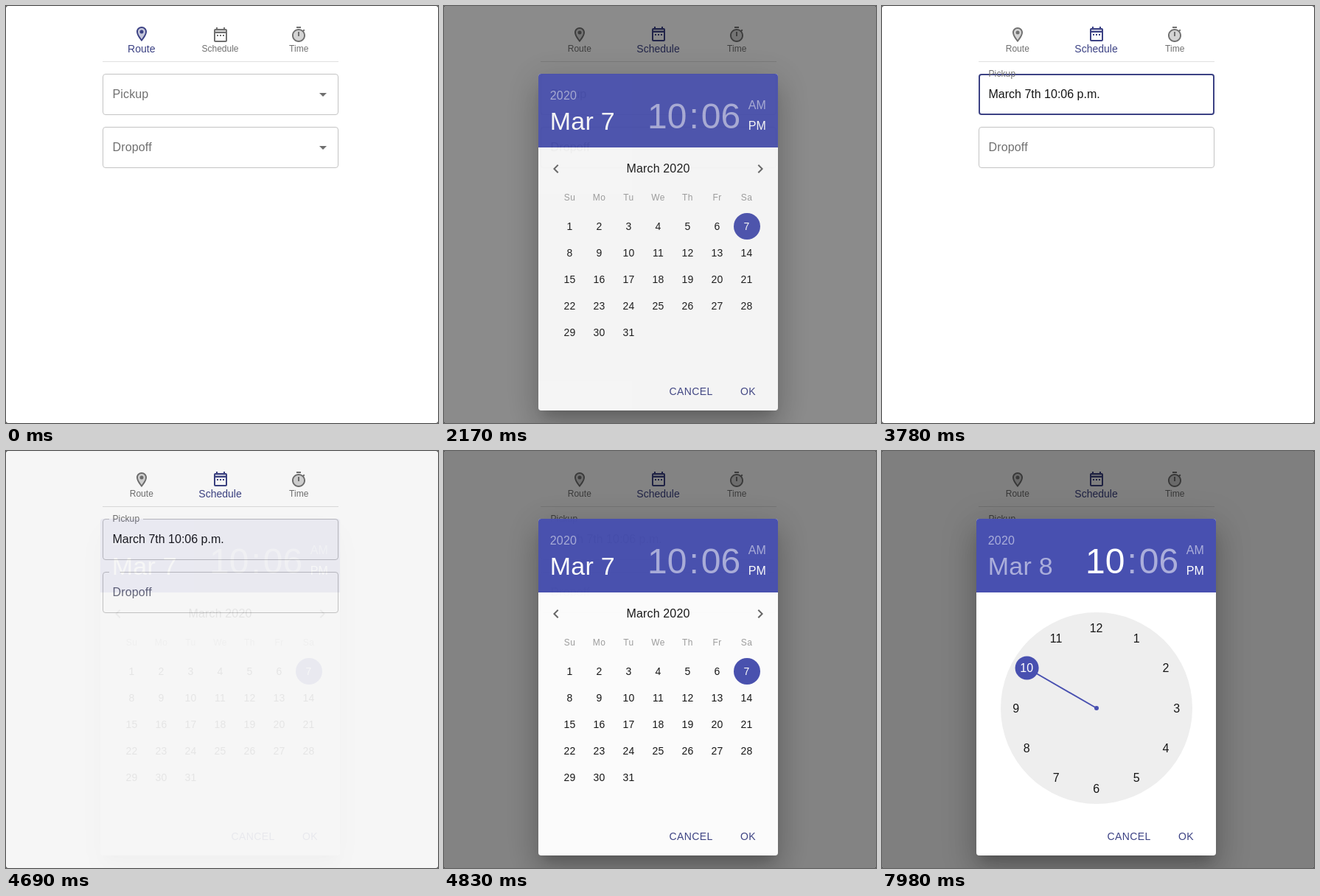
Recreate the animation shown at these times as an HTML page. Size 586 by 566 pixels, loop 8000 ms.

```html
<!DOCTYPE html>
<html lang="en">
<head>
<meta charset="utf-8">
<title>Booking form</title>
<style>
html, body { margin: 0; width: 100%; height: 100%; overflow: hidden; background: #444; }
svg { display: block; width: 586px; height: 566px; background: #fff; border-radius: 3px; }
text { font-family: "Liberation Sans", Arial, sans-serif; white-space: pre; }
#paper { filter: drop-shadow(0 0 0 transparent); }
.shadow { position: absolute; left: 128px; top: 92px; width: 325px; height: 457px; border-radius: 4px;
  box-shadow: 0 11px 15px -7px rgba(0,0,0,.2), 0 24px 38px 3px rgba(0,0,0,.14), 0 9px 46px 8px rgba(0,0,0,.12); }
</style>
</head>
<body>
<svg id="stage" viewBox="0 0 586 566">
  <defs>
    <clipPath id="tabClip"><rect x="237" y="19" width="107" height="56"/></clipPath>
    <clipPath id="okClip"><rect x="381" y="505" width="64" height="36" rx="4"/></clipPath>
    <clipPath id="paperClip"><rect x="128" y="92" width="325" height="457" rx="4"/></clipPath>
  </defs>
  <g id="page"></g>
  <rect id="backdrop" width="586" height="566"/>
  <g id="dialog"></g>
</svg>
<script>
const NS = 'http://www.w3.org/2000/svg';
const $ = id => document.getElementById(id);
const GREY = [112, 112, 112], INDIGO = [60, 66, 132], PRIMARY = '#4850b0', INK = '#161616';

function add(parent, tag, attrs = {}, text) {
  const el = document.createElementNS(NS, tag);
  set(el, attrs);
  if (text !== undefined) el.textContent = text;
  parent.appendChild(el);
  return el;
}
function set(el, attrs) {
  for (const k in attrs) el.setAttribute(k, attrs[k]);
}
function label(parent, str, x, y, size, fill, opts = {}) {
  return add(parent, 'text', { x, y, 'font-size': size, fill, ...opts }, str);
}
const MID = { 'text-anchor': 'middle' };
const show = (el, on) => set(el, { visibility: on ? 'visible' : 'hidden' });
const clamp = v => Math.max(0, Math.min(1, v));
const linear = (t, a, b) => clamp((t - a) / (b - a));
const mix = (a, b, k) => `rgb(${a.map((v, i) => Math.round(v + (b[i] - v) * k))})`;

// cubic-bezier(.4, 0, .2, 1)
function ease(x) {
  let lo = 0, hi = 1;
  for (let i = 0; i < 24; i++) {
    const m = (lo + hi) / 2, n = 1 - m;
    if (3 * n * n * m * .4 + 3 * n * m * m * .2 + m * m * m < x) lo = m; else hi = m;
  }
  return lo * lo * (3 - 2 * lo);
}
const eased = (t, a, b) => ease(linear(t, a, b));

// ---- page: tabs
const page = $('page'), dialog = $('dialog');
const tabRipple = add(page, 'circle', { cx: 291, cy: 46, fill: mix(INDIGO, INDIGO, 0), 'clip-path': 'url(#tabClip)' });

const TABS = [
  ['Route', 183.8,
    'M12 2C8.13 2 5 5.13 5 9c0 5.25 7 13 7 13s7-7.75 7-13c0-3.87-3.13-7-7-7zM7 9c0-2.76 2.24-5 5-5s5 2.24 5 5c0 2.88-2.88 7.19-5 9.88C9.92 16.21 7 11.85 7 9zM9.5 9a2.5 2.5 0 1 0 5 0a2.5 2.5 0 1 0-5 0z',
    'M7 9c0-2.76 2.24-5 5-5s5 2.24 5 5c0 2.88-2.88 7.19-5 9.88C9.92 16.21 7 11.85 7 9z'],
  ['Schedule', 290.5,
    'M19 4h-1V2h-2v2H8V2H6v2H5c-1.1 0-2 .9-2 2v14c0 1.1.9 2 2 2h14c1.1 0 2-.9 2-2V6c0-1.1-.9-2-2-2zm0 16H5V10h14v10zm0-12H5V6h14v2zM9 14H7v-2h2v2zm4 0h-2v-2h2v2zm4 0h-2v-2h2v2z',
    'M5 8h14V6H5z'],
  ['Time', 397.2,
    'M15 1H9v2h6V1zm-4 13h2V8h-2v6zm8.03-6.61l1.42-1.42c-.43-.51-.9-.99-1.41-1.41l-1.42 1.42C16.07 4.74 14.12 4 12 4c-4.97 0-9 4.03-9 9s4.02 9 9 9 9-4.03 9-9c0-2.12-.74-4.07-1.97-5.61zM12 20c-3.87 0-7-3.13-7-7s3.13-7 7-7 7 3.13 7 7-3.13 7-7 7z',
    'M5 13a7 7 0 1 0 14 0a7 7 0 1 0-14 0z']
].map(([name, x, line, tone]) => {
  const g = add(page, 'g');
  const icon = add(g, 'g');
  add(icon, 'path', { d: tone, opacity: .3 });
  add(icon, 'path', { d: line, 'fill-rule': 'evenodd' });
  return { g, icon, x, text: label(g, name, x, 62, 12, 'inherit', MID) };
});
TABS.forEach(tab => tab.text.removeAttribute('fill'));
add(page, 'rect', { x: 131, y: 75, width: 320, height: 1, fill: '#e0e0e0' });

function drawTab(tab, on) {
  set(tab.g, { fill: mix(GREY, INDIGO, on) });
  set(tab.icon, { transform: `translate(${Math.round(tab.x + .2) - 12} ${27 - on})` });
  set(tab.text, { 'font-size': 12 + 2 * on, y: 62 + on });
}

// ---- page: fields
function makeField(name, top, notch) {
  return {
    top, notch,
    border: add(page, 'path', { fill: 'none' }),
    name: label(page, name, 0, 0, 16, '#000', { 'letter-spacing': .15 }),
    caret: add(page, 'path', { d: `M425 ${top + 26}h10l-5 5z`, fill: '#6e6e6e' })
  };
}
const pickup = makeField('Pickup', 92, 46), dropoff = makeField('Dropoff', 164, 49);
const value = label(page, 'March 7th 10:06 p.m.', 144.5, 125, 16, INK);

function drawField(f, s) {
  const w = s.focus ? 2 : 1, h = w / 2, r = 4 - h;
  const x0 = 131 + h, x1 = 451 - h, y0 = f.top + h, y1 = f.top + 56 - h;
  const arc = (x, y) => `A${r} ${r} 0 0 1 ${x} ${y}`;
  set(f.border, {
    d: `M${140 + f.notch * s.gap} ${y0}H${x1 - r}${arc(x1, y0 + r)}V${y1 - r}${arc(x1 - r, y1)}` +
       `H${x0 + r}${arc(x0, y1 - r)}V${y0 + r}${arc(x0 + r, y0)}H140`,
    'stroke-width': w,
    stroke: s.focus ? mix(INDIGO, INDIGO, 0) : s.hover ? '#212121' : '#c4c4c4'
  });
  set(f.name, {
    transform: `translate(144.5 ${f.top + 33 - 29 * s.shrink}) scale(${1 - .25 * s.shrink})`,
    fill: mix(GREY, INDIGO, s.tint)
  });
}

// ---- dialog
const holder = add(dialog, 'foreignObject', { width: 586, height: 566 });
const shade = document.createElement('div');
shade.className = 'shadow';
shade.style.position = 'relative';
holder.appendChild(shade);

const paper = add(dialog, 'g', { 'clip-path': 'url(#paperClip)' });
add(paper, 'rect', { x: 128, y: 92, width: 325, height: 457, fill: '#fff' });
add(paper, 'rect', { x: 128, y: 92, width: 325, height: 100, fill: PRIMARY });

const DIM = { 'fill-opacity': .54 };
label(paper, '2020', 143.8, 127, 16, '#fff', { 'letter-spacing': .15, ...DIM });
const dateText = label(paper, 'Mar 7', 143.8, 168, 34, '#fff', { 'letter-spacing': .25 });
const hourText = label(paper, '10', 276, 166, 48, '#fff');
label(paper, ':', 332.5, 166, 48, '#fff', DIM);
label(paper, '06', 348.7, 166, 48, '#fff', DIM);
label(paper, 'AM', 412.8, 140, 16, '#fff', { 'letter-spacing': .15, ...DIM });
label(paper, 'PM', 412.8, 168, 16, '#fff', { 'letter-spacing': .15 });

const calendar = add(paper, 'g');
add(calendar, 'path', { transform: 'translate(140 209)', fill: '#666', d: 'M15.41 16.59L10.83 12l4.58-4.59L14 6l-6 6 6 6z' });
add(calendar, 'path', { transform: 'translate(417 209)', fill: '#666', d: 'M8.59 16.59L13.17 12 8.59 7.41 10 6l6 6-6 6z' });
label(calendar, 'March 2020', 290.5, 226, 16, INK, { 'letter-spacing': .15, ...MID });
const column = i => 170.5 + 40 * i;
['Su', 'Mo', 'Tu', 'We', 'Th', 'Fr', 'Sa'].forEach((d, i) =>
  label(calendar, d, column(i), 264, 12, '#9e9e9e', { 'letter-spacing': .4, ...MID }));
const dayHover = add(calendar, 'circle', { cx: 170.5, cy: 335, r: 18, fill: PRIMARY, opacity: .2 });
add(calendar, 'circle', { cx: 411, cy: 299, r: 18, fill: PRIMARY });
for (let d = 1; d <= 31; d++) {
  const i = d - 1;
  label(calendar, d, column(i % 7), 304 + 36 * Math.floor(i / 7), 14, d === 7 ? '#fff' : INK,
    { 'letter-spacing': .15, ...MID });
}

const clock = add(paper, 'g');
add(clock, 'circle', { cx: 291, cy: 349, r: 130, fill: '#eee' });
const spot = (h, r) => {
  const a = h * Math.PI / 6;
  return [291 + r * Math.sin(a), 349 - r * Math.cos(a)];
};
const [hx, hy] = spot(10, 109);
add(clock, 'path', { d: `M291 349L${hx} ${hy}`, stroke: PRIMARY, 'stroke-width': 2 });
add(clock, 'circle', { cx: 291, cy: 349, r: 3, fill: PRIMARY });
add(clock, 'circle', { cx: hx, cy: hy, r: 16, fill: PRIMARY });
for (let h = 1; h <= 12; h++) {
  const [x, y] = spot(h, 109);
  label(clock, h, x - .4, y + 5.5, 16, h === 10 ? '#fff' : INK, MID);
}

const okHover = add(paper, 'rect', { x: 381, y: 505, width: 64, height: 36, rx: 4, fill: PRIMARY, opacity: .04 });
const okRipple = add(paper, 'circle', { cx: 416, cy: 525, fill: PRIMARY, opacity: .28, 'clip-path': 'url(#okClip)' });
const BUTTON = { 'letter-spacing': .4 };
label(paper, 'CANCEL', 305.5, 528, 14, mix(INDIGO, INDIGO, 0), BUTTON);
label(paper, 'OK', 402, 528, 14, mix(INDIGO, INDIGO, 0), BUTTON);

// ---- timeline
function render(t) {
  const sched = eased(t, 430, 700);
  drawTab(TABS[0], 1 - sched);
  drawTab(TABS[1], sched);
  drawTab(TABS[2], 0);
  show(tabRipple, t >= 490 && t < 910);
  set(tabRipple, { r: 62 * eased(t, 400, 800), opacity: .22 * (1 - linear(t, 560, 910)) });

  const onRoute = t < 490, filled = t >= 3640;
  show(pickup.caret, onRoute);
  show(dropoff.caret, onRoute);
  show(value, filled);

  const first = eased(t, 1510, 1710) - eased(t, 2000, 2150);
  drawField(pickup, {
    hover: t >= 1190 && t < 1540,
    focus: t >= 1540 && t < 2030 || filled && t < 4200,
    shrink: filled ? eased(t, 3580, 3770) : first,
    gap: filled ? linear(t, 3800, 3900) : linear(t, 1560, 1660) - linear(t, 2000, 2120),
    tint: filled ? eased(t, 3790, 3990) - eased(t, 4170, 4400) : first
  });
  const second = eased(t, 4170, 4370);
  drawField(dropoff, {
    focus: t >= 4200 && t < 4550,
    shrink: second - eased(t, 4520, 4680),
    gap: linear(t, 4220, 4320) - linear(t, 4550, 4750),
    tint: second - .7 * eased(t, 4550, 4690) - .3 * eased(t, 4700, 4830)
  });

  const open = t < 4500 ? eased(t, 2024, 2249) - eased(t, 3640, 3780) : eased(t, 4655, 4880);
  set($('backdrop'), { opacity: open / 2 });
  set(dialog, { opacity: open });
  show(dialog, open > .001);
  dialog.style.display = open > .001 ? '' : 'none';

  const pressing = t >= 3220 && t < 3800;
  okHover.style.display = pressing ? '' : 'none';
  okRipple.style.display = pressing && t > 3290 ? '' : 'none';
  set(okRipple, { r: 41 * eased(t, 3290, 3840) });

  const timeView = t >= 7070;
  dayHover.style.display = t >= 7000 ? '' : 'none';
  calendar.style.display = timeView ? 'none' : '';
  clock.style.display = timeView ? '' : 'none';
  dateText.textContent = timeView ? 'Mar 8' : 'Mar 7';
  set(dateText, { 'fill-opacity': timeView ? .54 : 1 });
  set(hourText, { 'fill-opacity': timeView ? 1 : .54 });
}

// The picture advances in 70 ms ticks.
const TICK = 70, LOOP = 8000;
const start = performance.now();
function loop() {
  const t = (performance.now() - start) % LOOP;
  render(Math.floor(t / TICK) * TICK);
  requestAnimationFrame(loop);
}
render(0);
requestAnimationFrame(loop);
</script>
</body>
</html>
```
